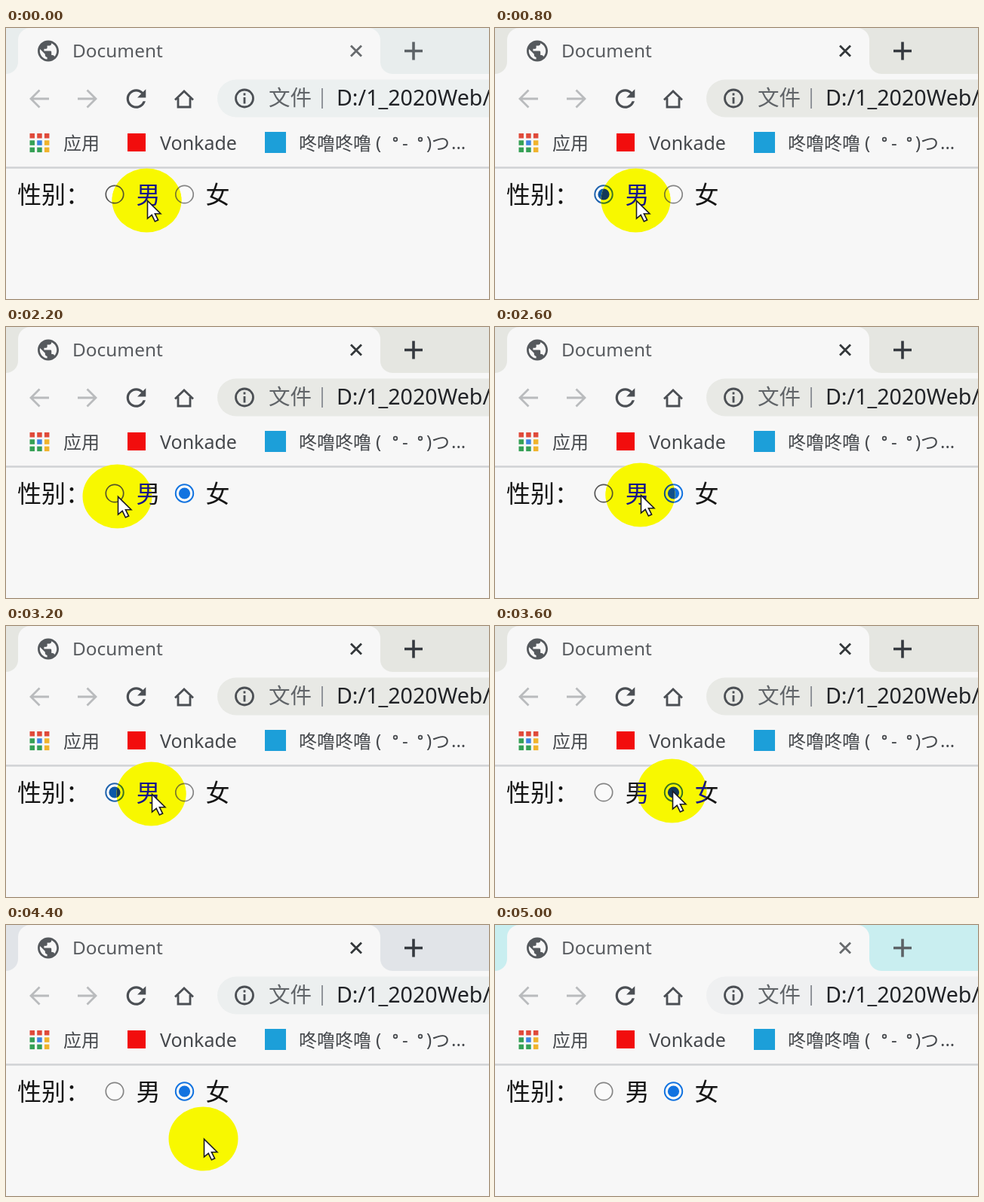
An HTML page that plays this animation: 640 by 360 pixels, repeating every 5200 ms.

```html
<!DOCTYPE html>
<html lang="zh-CN">
<head>
<meta charset="utf-8">
<title>Document</title>
<style>
html, body { margin: 0; width: 100%; height: 100%; overflow: hidden; background: #f7f7f7; }
svg { display: block; width: 640px; height: 360px; }
text { font-family: "Noto Sans", "Noto Sans CJK SC", sans-serif; white-space: pre; }
.mark { font-size: 24px; fill: #45484c; }
.line { fill: none; stroke: #4b4f54; stroke-width: 2.8; }
.dim { stroke: #b9bbbd; }
#page { font-size: 32px; fill: var(--ink); }
#page text { font-family: "Noto Sans CJK SC", sans-serif; }
.radio { fill: var(--paper); stroke: var(--ring); stroke-width: 1.7; }
.radio.hover { stroke: var(--ringHover); }
.radio.on { stroke: var(--on); stroke-width: 2; }
.radio.on.hover { stroke: var(--onHover); }
.dot { visibility: hidden; }
.on + .dot { visibility: visible; fill: var(--on); }
.on.hover + .dot { fill: var(--dotHover); }
.plain { --ink: #151515; --paper: #fafafa; --ring: #858585; --ringHover: #555; --on: #1273e0; --onHover: #1d62ae; --dotHover: #0b57a8; }
.lit { --ink: #15158a; --paper: #fbfb00; --ring: #77772c; --ringHover: #55552a; --on: #12508a; --onHover: #3a7420; --dotHover: #143858; }
</style>
</head>
<body>
<svg viewBox="0 0 640 360">
  <defs>
    <clipPath id="spot"><ellipse id="spotShape" rx="46" ry="42.5"/></clipPath>
  </defs>
  <rect width="640" height="360" fill="#f7f7f7"/>

  <!-- tab strip -->
  <rect id="strip" width="640" height="61"/>
  <path d="M0 61A16 16 0 0 0 16 45V16A16 16 0 0 1 32 0H480A16 16 0 0 1 496 16V45A16 16 0 0 0 512 61Z" fill="#f7f7f7"/>
  <path transform="translate(39.2 13.7) scale(1.4)" fill="#55595d" d="M12 2C6.480 2 2 6.480 2 12s4.480 10 10 10 10-4.480 10-10S17.520 2 12 2zm-1 17.930c-3.950-.49-7-3.850-7-7.930 0-.62.08-1.210.21-1.790L9 15v1c0 1.100.9 2 2 2zm6.900-2.540c-.26-.81-1-1.390-1.900-1.390h-1v-3c0-.55-.45-1-1-1H8v-2h2c.55 0 1-.45 1-1V7h2c1.100 0 2-.9 2-2v-.41c2.930 1.190 5 4.060 5 7.410 0 2.080-.8 3.970-2.100 5.390z"/>
  <text x="88" y="39" font-size="24.400" fill="#585b5f">Document</text>
  <path id="close" d="M457 23.500l14 14m0-14l-14 14" fill="none" stroke-width="2.800"/>
  <path id="plus" d="M528 30.500h24m-12-12v24" fill="none" stroke-width="3.600"/>

  <!-- toolbar -->
  <path class="line dim" d="M57 94H33m11.500-11.500L33 94l11.500 11.500M95 94h24m-11.500-11.500L119 94l-11.500 11.500"/>
  <path transform="translate(153.300 74.800) scale(1.6)" fill="#4b4f54" d="M17.650 6.350C16.200 4.900 14.210 4 12 4c-4.420 0-8 3.580-8 8s3.580 8 8 8c3.730 0 6.840-2.550 7.730-6h-2.080c-.82 2.330-3.040 4-5.650 4-3.310 0-6-2.690-6-6s2.690-6 6-6c1.660 0 3.140.69 4.220 1.780L13 11h7V4z"/>
  <path class="line" d="M224 95.500L236 84l12 11.500M228 93v12h16V93"/>
  <rect id="pill" x="280" y="68.500" width="420" height="50" rx="25"/>
  <circle class="line" cx="316" cy="93.500" r="11.500"/>
  <path class="line" d="M316 86.500v3m0 2.500v8.500"/>
  <text x="348" y="103" font-size="28.500" fill="#606468">文件</text>
  <path d="M419 80v27" stroke="#90949a" stroke-width="2"/>
  <text x="438" y="103" font-size="28.600" fill="#202226">D:/1_2020Web/</text>

  <!-- bookmarks -->
  <g id="apps"></g>
  <text class="mark" x="76" y="161.500">应用</text>
  <rect x="161" y="140" width="24" height="24" fill="#f20d0d"/>
  <text class="mark" x="204" y="161.500" style="font-size:25px">Vonkade</text>
  <rect x="343" y="138" width="28" height="28" fill="#1c9fd9"/>
  <g class="mark">
    <text x="388" y="161.500">咚噜咚噜</text>
    <text x="490" y="161">(</text><text x="525" y="161">-</text>
    <text x="557" y="161">)</text><text x="564" y="161.500">つ</text><text x="590" y="161">...</text>
    <g fill="none" stroke="#45484c" stroke-width="1.700"><circle cx="516" cy="148" r="2.300"/><circle cx="549" cy="148" r="2.300"/></g>
  </g>
  <path d="M0 185.500h640" stroke="#d0d2d5" stroke-width="2.400"/>

  <g class="plain">
    <g id="page">
      <text x="15" y="233">性别：</text>
      <circle class="radio" cx="144" cy="221" r="11.700"/><circle class="dot" cx="144" cy="221" r="7.600"/>
      <text x="172.500" y="233">男</text>
      <circle class="radio" cx="236.500" cy="221" r="11.700"/><circle class="dot" cx="236.500" cy="221" r="7.600"/>
      <text x="264.500" y="233">女</text>
    </g>
  </g>

  <g id="pointer">
    <g class="lit" clip-path="url(#spot)">
      <rect width="640" height="360" fill="#f8f800"/>
      <use href="#page"/>
    </g>
    <path id="arrow" d="M0 0V23.500l5.700-4.700 4.200 8.700 4.200-1.900-4.200-8.400h7.500z" fill="#fff" stroke="#1b1b22" stroke-width="1.600"/>
  </g>
</svg>
<script>
const $ = id => document.getElementById(id);
const LOOP = 5200;

// time, pointer x, pointer y, chosen radio
const moves = [
  [0, 187, 229, 0], [400, 187, 229, 1], [1000, 230, 225, 1], [1200, 283, 223, 1],
  [1400, 283, 223, 2], [2000, 200, 233, 2], [2200, 148, 225, 2], [2400, 175, 225, 2],
  [2600, 193, 223, 2], [2800, 193, 223, 1], [3400, 225, 220, 1], [3600, 235, 219, 2],
  [4400, 262, 284, 2], [4600, -99, -99, 2]
];
// time, tab strip, address bar, focused
const tints = [
  [0, '#e8eded', '#ecf0f0', false], [400, '#e5e6e1', '#e8e9e5', true],
  [4000, '#d9d8e8', '#e6f2f3', true], [4400, '#e1e4e8', '#ecefef', true],
  [4600, '#e8eded', '#ecf0f0', false], [5000, '#c9eef0', '#eff0f1', false]
];
const at = (list, t) => list.findLast(row => row[0] <= t);

const red = '#e04a3a', green = '#35a055', blue = '#3b83e0', yellow = '#f0b32c';
$('apps').innerHTML = [red, red, red, green, blue, yellow, green, green, yellow].map((c, i) =>
  `<rect x="${31.5 + i % 3 * 9.7}" y="${140 + Math.floor(i / 3) * 9.3}" width="6.5" height="6.5" fill="${c}"/>`).join('');

const radios = document.querySelectorAll('#page .radio');
const areas = [[131, 205], [224, 297]];

function draw(now) {
  const t = now % LOOP;
  const [, x, y, chosen] = at(moves, t);
  const [, strip, pill, focused] = at(tints, t);
  $('strip').setAttribute('fill', strip);
  $('pill').setAttribute('fill', pill);
  $('close').setAttribute('stroke', focused ? '#34383b' : '#686b6e');
  $('plus').setAttribute('stroke', focused ? '#35393f' : '#5c6266');
  radios.forEach((r, i) => {
    const [from, to] = areas[i];
    r.classList.toggle('on', chosen === i + 1);
    r.classList.toggle('hover', x >= from && x <= to && y < 245);
  });
  $('pointer').setAttribute('visibility', x < 0 ? 'hidden' : 'visible');
  $('spotShape').setAttribute('cx', x - 0.5);
  $('spotShape').setAttribute('cy', y);
  $('arrow').setAttribute('transform', `translate(${x + 0.5} ${y + 0.5})`);
  requestAnimationFrame(() => draw(performance.now()));
}
draw(0);
</script>
</body>
</html>
```
